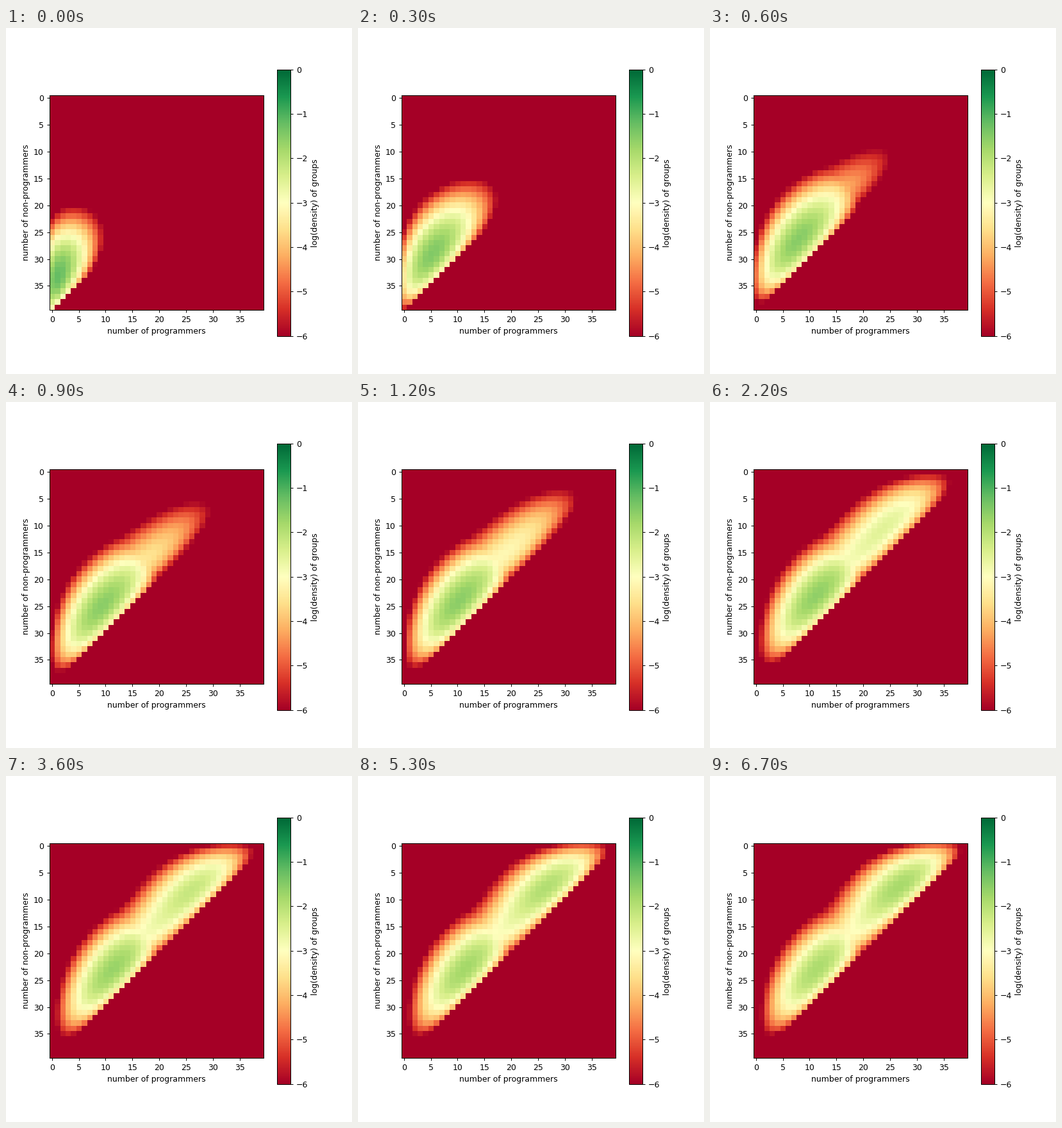
A matplotlib script for the animation above (8 s loop, 540x540 px).

```python
import numpy as np
import matplotlib.pyplot as plt
from matplotlib.animation import FuncAnimation

SEATS = 39                       # places in a group
LEAVE = 0.255                    # leaving rate per member and step
VACANT = 0.13                    # long-run share of empty places
JOIN = LEAVE * (1 - VACANT) / VACANT
MINORITY, MAJORITY = 0.345, 0.78  # chance that a newcomer programs
SUBSTEPS = 200
FRAMES, INTERVAL = 80, 100

y, x = np.mgrid[:SEATS + 1, :SEATS + 1]
empty = np.maximum(SEATS - x - y, 0)
chance = MINORITY + (MAJORITY - MINORITY) * np.heaviside(x - y, 0.5)

dt = 1 / SUBSTEPS
join_x = dt * JOIN * empty * chance
join_y = dt * JOIN * empty * (1 - chance)
leave_x = dt * LEAVE * x
leave_y = dt * LEAVE * y
stay = 1 - join_x - join_y - leave_x - leave_y


def start_density(px=0.04, py=0.83):
    """Multinomial spread of independent members."""
    p = np.zeros(x.shape)
    p[0, 0] = 1
    for _ in range(SEATS):
        p = ((1 - px - py) * p + px * np.roll(p, 1, axis=1)
             + py * np.roll(p, 1, axis=0))
    return p


def advance(p):
    for _ in range(SUBSTEPS):
        new = stay * p
        new[:, 1:] += (join_x * p)[:, :-1]
        new[1:] += (join_y * p)[:-1]
        new[:, :-1] += (leave_x * p)[:, 1:]
        new[:-1] += (leave_y * p)[1:]
        p = new
    return p


def step_at(frame):
    """The model advances every 150 ms, that is two steps per three frames."""
    return (2 * frame + 1) // 3


def log_density(p):
    return np.log10(np.maximum(p, 1e-6))


densities = [start_density()]
for _ in range(step_at(FRAMES - 1)):
    densities.append(advance(densities[-1]))

plt.rcParams["font.family"] = "DejaVu Sans"
fig = plt.figure(figsize=(6, 6), dpi=90)
ax = fig.add_subplot()
image = ax.imshow(log_density(densities[0]), cmap="RdYlGn", vmin=-6, vmax=0)
ax.set_xlabel("number of programmers")
ax.set_ylabel("number of non-programmers")
fig.colorbar(image, ax=ax, label="log(density) of groups")


def update(frame):
    image.set_data(log_density(densities[step_at(frame)]))
    return [image]


animation = FuncAnimation(fig, update, frames=FRAMES, interval=INTERVAL,
                          repeat=True, repeat_delay=0)
plt.show()
```
